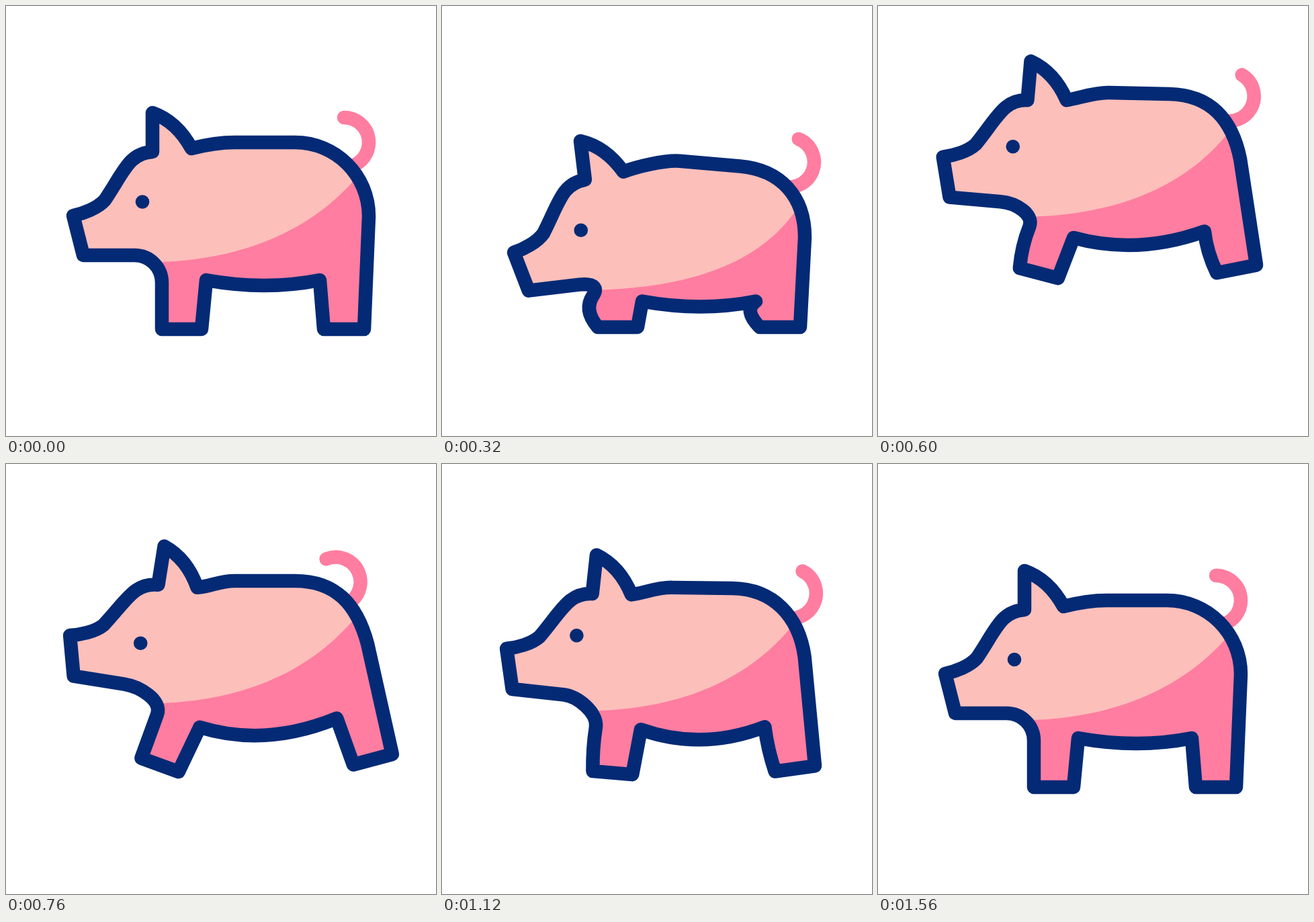
Write an HTML page with a canvas that moves like this. It is 640 by 640 pixels and loops after 2 s.

```html
<!DOCTYPE html>
<html lang="en">
<head>
<meta charset="utf-8">
<title>Jumping pig</title>
<style>
  html, body { margin: 0; height: 100%; overflow: hidden; background: #fff; }
  canvas { display: block; width: 100vw; height: 100vh; }
</style>
</head>
<body>
<canvas width="640" height="640"></canvas>
<script>
const ctx = document.querySelector('canvas').getContext('2d');
const NAVY = '#042a75', LIGHT = '#fdbfba', PINK = '#ff7da0';
const LOOP = 2000, RAD = Math.PI / 180;

// Eased value from [ms, value] keys.
function track(t, ...keys) {
  const next = keys.findIndex(k => k[0] > t);
  if (next < 1) return keys.at(next)[1];
  const [t0, a] = keys[next - 1], [t1, b] = keys[next];
  const u = (t - t0) / (t1 - t0);
  return a + (b - a) * u * u * (3 - 2 * u);
}

const crouch = t =>
  track(t, [0, 0], [320, 1], [360, 1], [720, 0], [760, 0], [940, 1], [1180, 0]);

// The second leap is weaker for the legs than for the head.
const leap = (t, second) =>
  track(t, [360, 0], [720, 1], [760, 1], [940, 0], [970, 0], [1180, second], [1560, 0]);

const tailTurn = t => track(t, [0, 0], [560, 36], [790, -25], [1020, 40], [1280, 0]);

const hop = (t, peak, half, height) =>
  height * Math.max(0, 1 - ((t - peak) / half) ** 2);

const drop = t => 31.5 * crouch(t) - hop(t, 602, 193, 78) - hop(t, 1230, 170, 34);

// Returns a function that turns x, y pairs about a pivot and moves them down.
function joint(px, py, degrees, dy) {
  const c = Math.cos(degrees * RAD), s = Math.sin(degrees * RAD);
  return (...xy) => xy.map((v, i) => i % 2
    ? py + (xy[i - 1] - px) * s + (v - py) * c + dy
    : px + (v - px) * c - (xy[i + 1] - py) * s);
}

function rig(t) {
  const fold = crouch(t), stretch = leap(t, 1), dy = drop(t);
  return {
    fold, stretch,
    head: joint(300, 265, 9 * stretch - 6.8 * fold, dy),
    torso: joint(390, 360, 5 * fold, dy - 4 * stretch),
    front: joint(268, 385, 20 * leap(t, .3), dy),
    hind: joint(463, 310, -15 * leap(t, .65), dy),
    level: joint(0, 0, 0, dy)
  };
}

function outline({ fold, stretch, head, torso, front, hind, level }) {
  const ground = 481 - 34.5 * fold, bend = 22 * fold, knee = 446 - 25 * fold;
  return new Path2D(`
    M${head(218, 159)} L${head(218, 217)}
    C${head(183, 219, 176, 246, 147, 289)}
    C${head(136, 301, 115, 309, 100, 312)}
    L${head(115, 371, 191, 371)}
    C${head(214, 371)} ${front(232, 389, 232 - 7 * fold, 412 - 13 * fold)}
    Q${front(232 - bend, knee, 232, ground)}
    L${front(291, ground, 298, 408)}
    Q${level(386, 424 + 23 * stretch)} ${hind(467, 408)}
    Q${hind(470 - bend, knee, 473, ground)}
    L${hind(533, ground, 540, 313)}
    C${hind(540, 252)} ${torso(491, 203, 430, 203)}
    L${torso(340, 203)}
    C${torso(318, 203)} ${head(296, 207, 276, 212)}
    C${head(262, 186, 243, 168, 218, 159)} Z`);
}

function lightSide({ fold, torso, level }) {
  const x = 28 * fold, y = 10 * fold;
  const start = level(232, 381 + y);
  return new Path2D(`M0,${start[1]} L${start}
    C${level(335 + x, 377 + y, 445 + x, 345 + y)} ${torso(522, 255)}
    L640,0 L0,0 Z`);
}

function drawTail(t) {
  ctx.save();
  ctx.translate(515, 238 + drop(t - 15)); // trails the body slightly
  ctx.rotate(tailTurn(t) * RAD);
  ctx.beginPath();
  ctx.arc(-12, -35, 37, -Math.PI / 2, 1.25);
  ctx.strokeStyle = PINK;
  ctx.stroke();
  ctx.restore();
}

function drawBody(pig) {
  const body = outline(pig);
  ctx.fillStyle = PINK;
  ctx.fill(body);
  ctx.save();
  ctx.clip(body);
  ctx.fillStyle = LIGHT;
  ctx.fill(lightSide(pig));
  ctx.restore();
  ctx.strokeStyle = NAVY;
  ctx.stroke(body);
}

function drawEye(t) {
  const [x, y] = rig(t + 20).head(203, 291); // looks ahead of the head
  ctx.beginPath();
  ctx.arc(x, y, 10.3, 0, 2 * Math.PI);
  ctx.fillStyle = NAVY;
  ctx.fill();
}

function render() {
  const t = performance.now() % LOOP;
  ctx.fillStyle = '#fff';
  ctx.fillRect(0, 0, 640, 640);
  ctx.lineWidth = 20.5;
  ctx.lineCap = ctx.lineJoin = 'round';
  drawTail(t);
  drawBody(rig(t));
  drawEye(t);
  requestAnimationFrame(render);
}
render();
</script>
</body>
</html>
```
